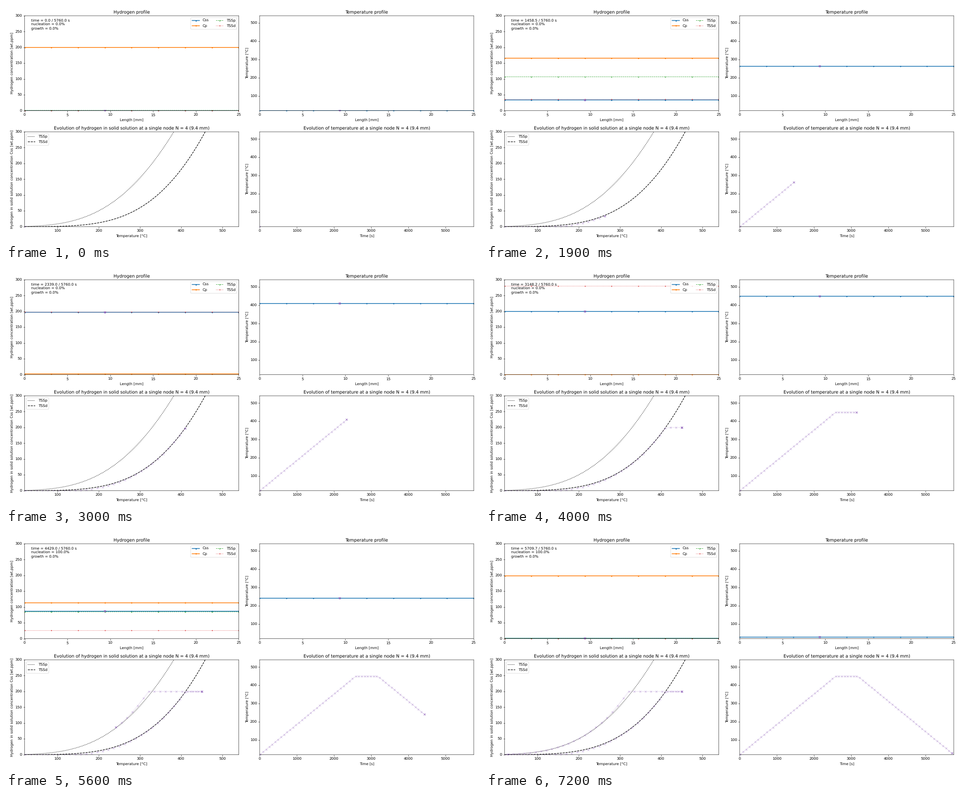
Animation, 1058 px wide and 529 px high, one loop 7.3 s. Source, as a matplotlib script:

```python
import numpy as np
import matplotlib.pyplot as plt
from matplotlib.animation import FuncAnimation

FRAMES, INTERVAL = 73, 100
WIDTH, LAYOUT_DPI = 1058, 100
T_END, T_HOT, T_COOL = 5760.0, 2580.0, 3180.0
TOTAL, GAS = 200.0, 8.314
PURPLE = "tab:purple"


def tss_p(temp):
    return 30853.3 * np.exp(-25249.6 / (GAS * (temp + 273.15)))


def tss_d(temp):
    return 102000 * np.exp(-35458.7 / (GAS * (temp + 273.15)))


def temperature(t):
    return np.interp(t, [0, T_HOT, T_COOL, T_END], [20, 450, 450, 20])


def dissolve():
    """Hydrogen in solution for each second of heating and holding."""
    c = tss_d(20.0)
    out = [c]
    for t in range(1, int(T_COOL) + 1):
        temp = temperature(t)
        rate = 0.05 * np.exp(-6000 * (1 / (temp + 273.15) - 1 / 536.24))
        c = min(TOTAL, (c + rate * tss_d(temp)) / (1 + rate))
        out.append(c)
    return np.array(out)


def solution(t):
    """Dissolution while heating, delayed precipitation while cooling."""
    temp = temperature(t)
    heating = np.interp(t, np.arange(T_COOL + 1), dissolve())
    excess = 11.4 * np.exp((temp - 308.5) / 37.4)
    cooling = np.minimum(TOTAL, tss_p(temp) + excess)
    return np.where(t <= T_COOL, heating, cooling)


# Saved times: a short first step, then even ones with one longer step at the hold
step = np.arange(FRAMES)
times = 17.6 + 80.048 * (step - 1) + np.where(step >= 33, 8.71, 0)
times[0] = 0
temps = temperature(times)
css = solution(times)
nodes = np.linspace(0, 25, 9)
node = nodes[3]

fig, axes = plt.subplots(2, 2, figsize=(18, 9), dpi=LAYOUT_DPI)
(ax_h, ax_t), (ax_css, ax_time) = axes


def setup(ax, title, xlabel, ylabel, xlim, ylim):
    ax.set(title=title, xlabel=xlabel, ylabel=ylabel, xlim=xlim, ylim=ylim)


TEMP = "Temperature [°C]"
AT_NODE = "at a single node N = 4 (9.4 mm)"
setup(ax_h, "Hydrogen profile", "Length [mm]",
      "Hydrogen concentration [wt.ppm]", (0, 25), (0, 300))
setup(ax_t, "Temperature profile", "Length [mm]", TEMP, (0, 25), (20, 540))
setup(ax_css, f"Evolution of hydrogen in solid solution {AT_NODE}", TEMP,
      "Hydrogen in solid solution concentration Css [wt.ppm]",
      (20, 540), (0, 300))
setup(ax_time, f"Evolution of temperature {AT_NODE}", "Time [s]", TEMP,
      (0, T_END), (20, 540))


def profile(ax, color, style="-", width=2, size=5, label=None):
    return ax.plot(nodes, nodes * 0, style, marker=".", color=color, lw=width,
                   ms=size, label=label)[0]


def cross(ax, width=1.0):
    return ax.plot([], [], "x", color=PURPLE, ms=6, mew=width)[0]


def trail(ax):
    return ax.plot([], [], "x:", color=PURPLE, ms=6, lw=1.5, alpha=0.5)[0]


css_line = profile(ax_h, "tab:blue", label="Css")
cp_line = profile(ax_h, "tab:orange", label="Cp")
p_line = profile(ax_h, "tab:green", "--", 1, 3, "TSSp")
d_line = profile(ax_h, "tab:red", ":", 1, 3, "TSSd")
temp_line = profile(ax_t, "tab:blue")
h_mark, t_mark = cross(ax_h, 2), cross(ax_t, 2)
ax_h.legend(loc="upper right", ncol=2)
info = ax_h.text(0.03, 0.97, "", transform=ax_h.transAxes, va="top")

grid = np.linspace(20, 540, 300)
ax_css.plot(grid, tss_p(grid), "k:", label="TSSp")
ax_css.plot(grid, tss_d(grid), "k--", label="TSSd")
ax_css.legend(loc="upper left")
css_trail, time_trail = trail(ax_css), trail(ax_time)
css_mark, time_mark = cross(ax_css), cross(ax_time)

# Lay out at full resolution, then shrink to the stage with subpixel drawing
fig.tight_layout()
fig.set_dpi(WIDTH / 18)
plt.rcParams.update({"path.snap": False, "text.hinting": "none"})


def update(i):
    t, temp, c = times[i], temps[i], css[i]
    levels = [(css_line, c), (cp_line, TOTAL - c), (p_line, tss_p(temp)),
              (d_line, tss_d(temp)), (temp_line, temp)]
    for line, level in levels:
        line.set_ydata(np.full(nodes.size, level))
    h_mark.set_data([node], [c])
    t_mark.set_data([node], [temp])

    css_trail.set_data(temps[:i + 1], css[:i + 1])
    time_trail.set_data(times[:i + 1], temps[:i + 1])
    css_mark.set_data([temp], [c])
    time_mark.set_data([t], [temp])

    nucleation = 100.0 if t > T_COOL and c > tss_p(temp) else 0.0
    info.set_text(f"time = {t:.1f} / {T_END:.1f} s\n"
                  f"nucleation = {nucleation:.1f}%\ngrowth = 0.0%")
    return []


anim = FuncAnimation(fig, update, frames=FRAMES, interval=INTERVAL,
                     repeat=True, repeat_delay=0)
plt.show()
```
